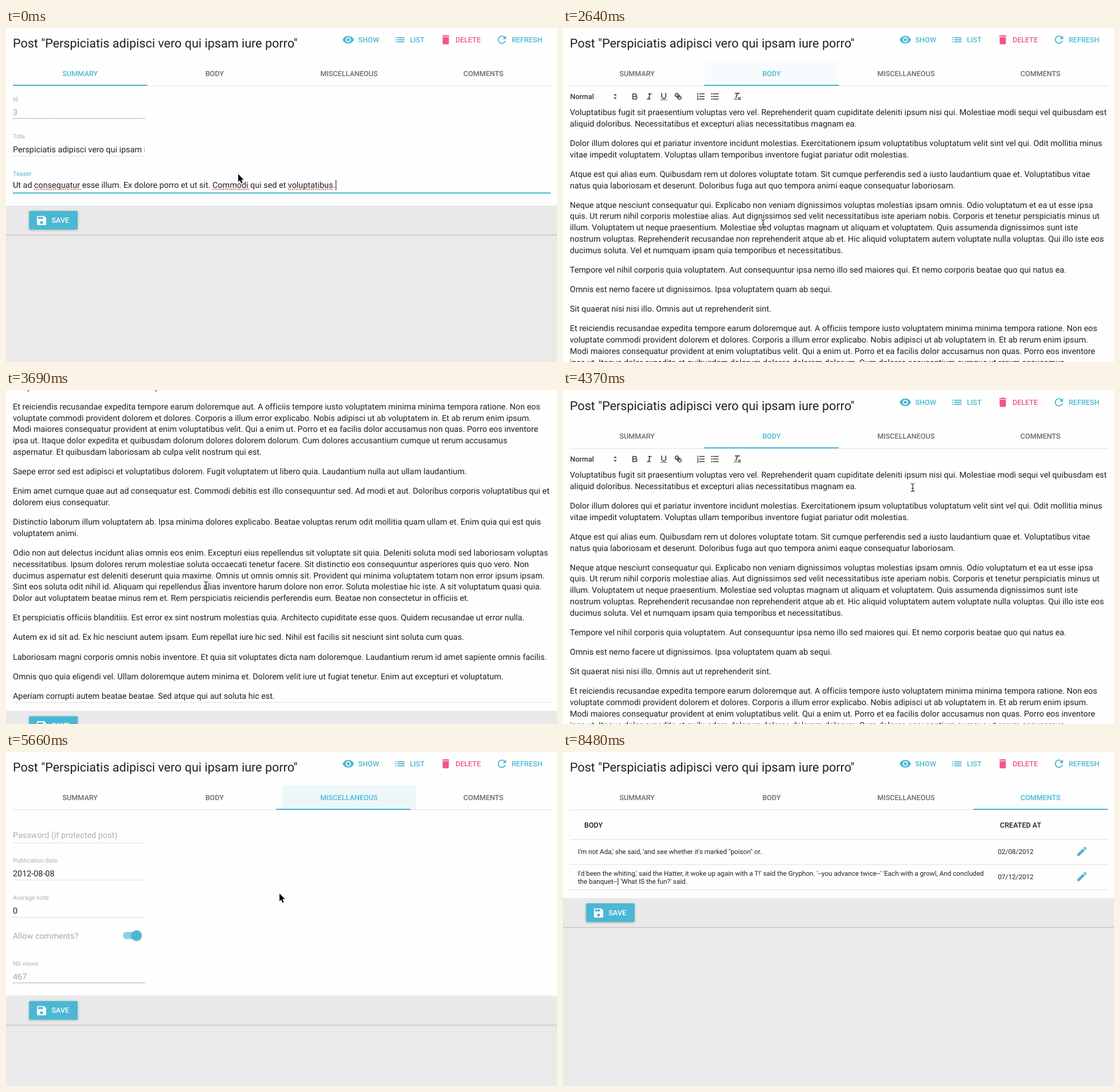
These frames come from a looping animation (961x583 px, 9.36 s). An HTML page with a canvas:

```html
<!DOCTYPE html>
<html lang="en">
<head>
<meta charset="utf-8">
<title>Post editor</title>
<style>
html, body { margin: 0; width: 100%; height: 100%; overflow: hidden; background: #fefefe; }
canvas { display: block; }
</style>
</head>
<body>
<canvas id="stage" width="961" height="583"></canvas>
<script>
const W = 961, H = 583, LOOP = 9360;
const ZOOM = 0.8985; // the page is shown slightly reduced
const BLUE = '#4ab8d3', PINK = '#ef5785', INK = '#202020', PAPER = '#fefefe';
const MUTED = '#b0b0b0', RULE = '#e0e0e0';
const ctx = document.getElementById('stage').getContext('2d');
ctx.textRendering = 'geometricPrecision';
ctx.letterSpacing = '0.002px'; // any spacing turns ligatures off

// Moments at which the picture refreshes: [first, last, count]
const TICKS = [
  [0, 60, 2], [240, 470, 4], [950, 950, 1], [1490, 1970, 6], [2150, 2640, 8],
  [2760, 2850, 2], [3030, 3390, 3], [3540, 3690, 2], [3870, 4050, 2], [4190, 4370, 2],
  [4520, 4670, 2], [4820, 4940, 3], [5120, 5210, 2], [5390, 5450, 2], [5660, 5980, 6],
  [6160, 6880, 12], [7060, 7060, 1], [7230, 8140, 14], [8280, 8480, 4]
].flatMap(([a, b, n]) => Array.from({ length: n }, (_, i) => n > 1 ? a + (b - a) * i / (n - 1) : a));

const POINTER = [
  [0, 405, 255], [60, 377, 211], [240, 362, 130], [470, 349, 80], [2150, 349, 82],
  [2360, 349, 190], [2640, 349, 341], [3690, 349, 341], [4370, 610, 170],
  [4520, 610, 133], [4670, 617, 95], [4820, 610, 86], [4940, 608, 82], [5390, 604, 88],
  [5450, 570, 140], [5660, 477, 247], [5850, 432, 240], [6160, 430, 236], [6500, 600, 160],
  [6880, 833, 82], [7400, 833, 82], [7800, 862, 270], [8140, 885, 526],
  [8280, 889, 540], [8400, 897, 562], [8480, 902, 600]
];
const SCROLL = [
  [2640, 0], [2760, 30], [2850, 170], [3030, 568.2], [3210, 560], [3390, 553], [3540, 541],
  [3690, 495.5], [3870, 300], [4050, 60], [4190, -8], [4370, -1], [4520, 0]
];
// press: ripple start, show: content swap, slide: ink bar start
const CLICKS = [
  { tab: 1, press: 1490, show: 1670, slide: 1490, x: 349, y: 82 },
  { tab: 2, press: 5120, show: 5390, slide: 5190, x: 608, y: 84 },
  { tab: 3, press: 7060, show: 7230, slide: 7060, x: 833, y: 84 }
];
const TABS = ['SUMMARY', 'BODY', 'MISCELLANEOUS', 'COMMENTS'];
const TAB_X = 12, TAB_W = 234.5;
const BAR_TOP = [310, 1055.7, 425.5, 255];

const BODY = `Voluptatibus fugit sit praesentium voluptas vero vel. Reprehenderit quam cupiditate deleniti ipsum nisi qui. Molestiae modi sequi vel quibusdam est
aliquid doloribus. Necessitatibus et excepturi alias necessitatibus magnam ea.

Dolor illum dolores qui et pariatur inventore incidunt molestias. Exercitationem ipsum voluptatibus voluptatum velit sint vel qui. Odit mollitia minus
vitae impedit voluptatem. Voluptas ullam temporibus inventore fugiat pariatur odit molestias.

Atque est qui alias eum. Quibusdam rem ut dolores voluptate totam. Sit cumque perferendis sed a iusto laudantium quae et. Voluptatibus vitae
natus quia laboriosam et deserunt. Doloribus fuga aut quo tempora animi eaque consequatur laboriosam.

Neque atque nesciunt consequatur qui. Explicabo non veniam dignissimos voluptas molestias ipsam omnis. Odio voluptatum et ea ut esse ipsa
quis. Ut rerum nihil corporis molestiae alias. Aut dignissimos sed velit necessitatibus iste aperiam nobis. Corporis et tenetur perspiciatis minus ut
illum. Voluptatem ut neque praesentium. Molestiae sed voluptas magnam ut aliquam et voluptatem. Quis assumenda dignissimos sunt iste
nostrum voluptas. Reprehenderit recusandae non reprehenderit atque ab et. Hic aliquid voluptatem autem voluptate nulla voluptas. Qui illo iste eos
ducimus soluta. Vel et numquam ipsam quia temporibus et necessitatibus.

Tempore vel nihil corporis quia voluptatem. Aut consequuntur ipsa nemo illo sed maiores qui. Et nemo corporis beatae quo qui natus ea.

Omnis est nemo facere ut dignissimos. Ipsa voluptatem quam ab sequi.

Sit quaerat nisi nisi illo. Omnis aut ut reprehenderit sint.

Et reiciendis recusandae expedita tempore earum doloremque aut. A officiis tempore iusto voluptatem minima minima tempora ratione. Non eos
voluptate commodi provident dolorem et dolores. Corporis a illum error explicabo. Nobis adipisci ut ab voluptatem in. Et ab rerum enim ipsum.
Modi maiores consequatur provident at enim voluptatibus velit. Qui a enim ut. Porro et ea facilis dolor accusamus non quas. Porro eos inventore
ipsa ut. Itaque dolor expedita et quibusdam dolorum dolores dolorem dolorum. Cum dolores accusantium cumque ut rerum accusamus
aspernatur. Et quibusdam laboriosam ab culpa velit nostrum qui est.

Saepe error sed est adipisci et voluptatibus dolorem. Fugit voluptatem ut libero quia. Laudantium nulla aut ullam laudantium.

Enim amet cumque quae aut ad consequatur est. Commodi debitis est illo consequuntur sed. Ad modi et aut. Doloribus corporis voluptatibus qui et
dolorem eius consequatur.

Distinctio laborum illum voluptatem ab. Ipsa minima dolores explicabo. Beatae voluptas rerum odit mollitia quam ullam et. Enim quia qui est quis
voluptatem animi.

Odio non aut delectus incidunt alias omnis eos enim. Excepturi eius repellendus sit voluptate sit quia. Deleniti soluta modi sed laboriosam voluptas
necessitatibus. Ipsum dolores rerum molestiae soluta occaecati tenetur facere. Sit distinctio eos consequuntur asperiores quis quo vero. Non
ducimus aspernatur est deleniti deserunt quia maxime. Omnis ut omnis omnis sit. Provident qui minima voluptatem totam non error ipsum ipsam.
Sint eos soluta odit nihil id. Aliquam qui repellendus alias inventore harum dolore non error. Soluta molestiae hic iste. A sit voluptatum quasi quia.
Dolor aut voluptatem beatae minus rem et. Rem perspiciatis reiciendis perferendis eum. Beatae non consectetur in officiis et.

Et perspiciatis officiis blanditiis. Est error ex sint nostrum molestias quia. Architecto cupiditate esse quos. Quidem recusandae ut error nulla.

Autem ex id sit ad. Ex hic nesciunt autem ipsam. Eum repellat iure hic sed. Nihil est facilis sit nesciunt sint soluta cum quas.

Laboriosam magni corporis omnis nobis inventore. Et quia sit voluptates dicta nam doloremque. Laudantium rerum id amet sapiente omnis facilis.

Omnis quo quia eligendi vel. Ullam doloremque autem minima et. Dolorem velit iure ut fugiat tenetur. Enim aut excepturi et voluptatum.

Aperiam corrupti autem beatae beatae. Sed atque qui aut soluta hic est.`.split('\n\n').map(p => p.split('\n'));

const ICON = {
  show: 'M12 4.5C7 4.5 2.73 7.61 1 12c1.73 4.39 6 7.5 11 7.5s9.27-3.11 11-7.5c-1.73-4.39-6-7.5-11-7.5zM12 17c-2.76 0-5-2.24-5-5s2.24-5 5-5 5 2.24 5 5-2.24 5-5 5zm0-8c-1.66 0-3 1.34-3 3s1.34 3 3 3 3-1.34 3-3-1.34-3-3-3z',
  list: 'M3 13h2v-2H3zm0 4h2v-2H3zm0-8h2V7H3zm4 4h14v-2H7zm0 4h14v-2H7zM7 7v2h14V7z',
  bin: 'M6 19c0 1.1.9 2 2 2h8c1.1 0 2-.9 2-2V7H6v12zM19 4h-3.5l-1-1h-5l-1 1H5v2h14V4z',
  refresh: 'M17.65 6.35C16.2 4.9 14.21 4 12 4c-4.42 0-7.99 3.58-7.99 8s3.57 8 7.99 8c3.73 0 6.84-2.55 7.73-6h-2.08c-.82 2.33-3.04 4-5.65 4-3.31 0-6-2.69-6-6s2.69-6 6-6c1.66 0 3.14.69 4.22 1.78L13 11h7V4l-2.35 2.35z',
  save: 'M17 3H5c-1.11 0-2 .9-2 2v14c0 1.1.89 2 2 2h14c1.1 0 2-.9 2-2V7l-4-4zm-5 16c-1.66 0-3-1.34-3-3s1.34-3 3-3 3 1.34 3 3-1.34 3-3 3zm3-10H5V5h10v4z',
  pencil: 'M3 17.25V21h3.75L17.81 9.94l-3.75-3.75L3 17.25zM20.71 7.04c.39-.39.39-1.02 0-1.41l-2.34-2.34c-.39-.39-1.02-.39-1.41 0l-1.83 1.83 3.75 3.75 1.83-1.83z'
};
// Editor tools on an 18-unit grid: [centre x, thick strokes, thin strokes]
const TOOLS = [
  [125.3, 'M5 4H9.5a2.5 2.5 0 0 1 0 5H5zM5 9h5.5a2.5 2.5 0 0 1 0 5H5z', ''],
  [150.5, 'M7 4H13M5 14H11M8 14L10 4', ''],
  [175.7, 'M5 3V9a4 4 0 0 0 8 0V3', 'M3 15.5H15'],
  [201, 'M7 7L11 11M8.9 4.6a3.4 3.4 0 0 1 .3 4.6a3.4 3.4 0 0 1-4.6-.3C3.2 7.5 2 6.4 4.2 4.2S7.5 3.2 8.9 4.6zM13.4 9.1a3.4 3.4 0 0 0-4.6-.3a3.4 3.4 0 0 0 .3 4.6c1.4 1.4 2.5 2.5 4.7.3S14.8 10.5 13.4 9.1z', ''],
  [240, 'M7 4H16M7 9H16M7 14H16', 'M2.5 3L3.5 2.5V5.5M2.5 5.5H4.5M2.5 8H4.4L2.5 10.5H4.6M2.5 12.5H4.5V15.5H2.5M3 14H4.5'],
  [265, 'M6 4H15.5M6 9H15.5M6 14H15.5M2 4H4M2 9H4M2 14H4', ''],
  [304, 'M5 3H13M6.2 12L9.3 3M11 11L15 15M15 11L11 15', 'M2 14.5H9']
];

function ease(p) {
  if (p <= 0) return 0;
  if (p >= 1) return 1;
  let lo = 0, hi = 1;
  for (let i = 0; i < 24; i++) {
    const s = (lo + hi) / 2, r = 1 - s;
    if (3 * r * r * s * 0.23 + 3 * r * s * s * 0.32 + s ** 3 < p) lo = s; else hi = s;
  }
  return 1 - (1 - lo) ** 3;
}

function track(keys, t) {
  if (t <= keys[0][0]) return keys[0].slice(1);
  const i = keys.findIndex(k => k[0] > t);
  if (i < 0) return keys[keys.length - 1].slice(1);
  const a = keys[i - 1], b = keys[i], p = (t - a[0]) / (b[0] - a[0]);
  return a.slice(1).map((v, j) => v + (b[j + 1] - v) * p);
}

function rect(x, y, w, h, color) {
  ctx.fillStyle = color;
  ctx.fillRect(x, y, w, h);
}

function text(str, x, y, size = 16, color = INK, weight = 400, align = 'left') {
  ctx.font = `${weight} ${size * ZOOM}px Roboto, sans-serif`;
  ctx.textAlign = align;
  ctx.fillStyle = color;
  ctx.fillText(str, x, y);
}

function icon(name, cx, cy, color) {
  ctx.save();
  ctx.translate(cx, cy);
  ctx.scale(ZOOM, ZOOM);
  ctx.translate(-12, -12);
  ctx.fillStyle = color;
  ctx.fill(new Path2D(ICON[name]));
  ctx.restore();
}

function dots(x, y, w, color, size, gap) {
  ctx.fillStyle = color;
  for (let d = 0; d < w; d += gap) ctx.fillRect(x + d, y, size, size);
}

function field(name, value, y, locked) {
  const tone = locked ? '#a6a6a6' : INK;
  text(name, 12, y - 30, 12, MUTED);
  ctx.save();
  ctx.beginPath();
  ctx.rect(12, y - 24, 230, 24);
  ctx.clip();
  text(value, 12, y - 6.3, 16, tone);
  ctx.restore();
  if (locked) dots(12, y - 1, 230, '#a8a8a8', 1.7, 3);
  else rect(12, y, 230, 1, RULE);
}

function header(t, now) {
  text('Post "Perspiciatis adipisci vero qui ipsam iure porro"', 12, 34, 24);
  [['show', 'SHOW', 597, 614.5, BLUE], ['list', 'LIST', 687, 704.5, BLUE],
   ['bin', 'DELETE', 767, 784, PINK], ['refresh', 'REFRESH', 865, 882, BLUE]]
    .forEach(([name, label, cx, x, color]) => {
      icon(name, cx, 20.5, color);
      text(label, x, 25, 14, color, 500);
    });

  for (const c of CLICKS) {
    const age = t - c.press;
    if (age < 0 || age > 1600) continue;
    const left = TAB_X + c.tab * TAB_W;
    const reach = Math.hypot(Math.max(c.x - left, left + TAB_W - c.x), 28);
    ctx.save();
    ctx.beginPath();
    ctx.rect(left, 58, TAB_W, 43);
    ctx.clip();
    ctx.globalAlpha = 0.14 * (1 - age / 1600);
    ctx.fillStyle = BLUE;
    ctx.beginPath();
    ctx.arc(c.x, c.y, reach * ease(age / 1000), 0, 7);
    ctx.fill();
    ctx.restore();
  }
  TABS.forEach((label, i) =>
    text(label, TAB_X + (i + 0.5) * TAB_W, 83.5, 14, i === now ? BLUE : '#6c6c6c', 500, 'center'));
  rect(12, 100.5, 938, 1, RULE);
  const slid = now ? now - 1 + ease((t - CLICKS[now - 1].slide) / 1000) : 0;
  rect(TAB_X + slid * TAB_W, 99, TAB_W, 2, BLUE);
}

function summary(t) {
  field('Id', '3', 158, true);
  field('Title', 'Perspiciatis adipisci vero qui ipsam iure porro', 223);
  const line = 'Ut ad consequatur esse illum. Ex dolore porro et ut sit. Commodi qui sed et voluptatibus.';
  text('Teaser', 12, 257.5, 12, BLUE);
  text(line, 12, 279);
  for (const word of ['consequatur', 'Commodi', 'voluptatibus']) {
    const x = 12 + ctx.measureText(line.slice(0, line.indexOf(word))).width;
    dots(x, 280.5, ctx.measureText(word).width, '#ee5a50', 2, 3.6);
  }
  rect(12, 287, 938, 2, BLUE);
  if (t < 470 || t >= 950 && t < 1490)
    rect(Math.round(12.5 + ctx.measureText(line).width), 265, 1, 18, '#111');
}

function editor() {
  text('Normal', 12.5, 124, 14, '#333', 500);
  const draw = (cx, strokes, thin, filled) => {
    ctx.save();
    ctx.translate(cx, 119.5);
    ctx.scale(ZOOM, ZOOM);
    ctx.translate(-9, -9);
    ctx.strokeStyle = ctx.fillStyle = '#3c3c3c';
    ctx.lineCap = ctx.lineJoin = 'round';
    if (filled) ctx.fill(new Path2D(filled));
    ctx.lineWidth = 1.8;
    ctx.stroke(new Path2D(strokes));
    ctx.lineWidth = 1;
    ctx.stroke(new Path2D(thin));
    ctx.restore();
  };
  draw(91, '', '', 'M6 11H12L9 14.2zM6 7H12L9 3.8z');
  TOOLS.forEach(tool => draw(...tool));
  let y = 152;
  for (const para of BODY) {
    for (const line of para) {
      text(line, 12, y);
      y += 22 * ZOOM;
    }
    y += 16 * ZOOM;
  }
  rect(12, 1040.2, 938, 1, RULE);
}

function misc() {
  text('Password (if protected post)', 12, 150.3, 16, MUTED);
  rect(12, 158, 230, 1, RULE);
  field('Publication date', '2012-08-08', 223);
  field('Average note', '0', 288);
  text('Allow comments?', 12, 325.7, 16, '#a9a9a9');
  ctx.fillStyle = '#86d2e3';
  ctx.beginPath();
  ctx.roundRect(204, 314, 32, 12.6, 6.3);
  ctx.fill();
  ctx.save();
  ctx.shadowColor = 'rgba(0,0,0,.25)';
  ctx.shadowBlur = 3;
  ctx.shadowOffsetY = 1;
  ctx.fillStyle = BLUE;
  ctx.beginPath();
  ctx.arc(227.7, 320.3, 9, 0, 7);
  ctx.fill();
  ctx.restore();
  field('Nb views', '467', 403, true);
}

function comments() {
  text('BODY', 37, 132.3, 14, INK, 500);
  text('CREATED AT', 762, 132.3, 14, INK, 500);
  [152, 196, 240].forEach(y => rect(12, y, 938, 1, RULE));
  text(`I'm not Ada,' she said, 'and see whether it's marked "poison" or.`, 26, 178, 13);
  text(`I'd been the whiting,' said the Hatter, it woke up again with a T!' said the Gryphon. '--you advance twice--' 'Each with a growl, And concluded`, 26, 216, 13);
  text(`the banquet--] 'What IS the fun?' said.`, 26, 229.5, 13);
  text('02/08/2012', 758.5, 178, 13);
  text('07/12/2012', 758.5, 222, 13);
  icon('pencil', 905, 173.5, BLUE);
  icon('pencil', 905, 217.5, BLUE);
}

function saveBar(y, end) {
  rect(0, y, W, end - y, '#eaeaea');
  rect(0, y, W, 51, '#e9e9e9');
  rect(0, y + 50.5, W, 1.5, '#cbcbcb');
  rect(0, y + 52, W, 1, '#e0e0e0');
  ctx.save();
  ctx.shadowColor = 'rgba(0,0,0,.24)';
  ctx.shadowBlur = 4;
  ctx.shadowOffsetY = 1;
  ctx.fillStyle = BLUE;
  ctx.beginPath();
  ctx.roundRect(40.2, y + 9.3, 84.8, 32.5, 2);
  ctx.fill();
  ctx.restore();
  icon('save', 62, y + 26, '#fff');
  text('SAVE', 79.5, y + 29.9, 14, '#fff', 500);
}

function pointer(x, y, now) {
  ctx.save();
  ctx.translate(x, y);
  ctx.lineJoin = 'round';
  if (y > 57 && y < 101) {
    const hand = new Path2D('M-1.5 1Q0-1 1.5 1V6L7 7.5Q9 8 8.6 10L7.5 15H-1L-5.5 9.5Q-5.5 7.5-3.5 8L-1.5 10Z');
    ctx.fillStyle = '#fff';
    ctx.fill(hand);
    ctx.strokeStyle = '#111';
    ctx.lineWidth = 1.1;
    ctx.stroke(hand);
  } else if (now === 1) {
    const beam = new Path2D('M-3.5-6.5Q0-6.5 0-4.5Q0-6.5 3.5-6.5M0-4.5V5M-3.5 7Q0 7 0 5Q0 7 3.5 7M-2 1.5H2');
    ctx.strokeStyle = 'rgba(255,255,255,.8)';
    ctx.lineWidth = 2.5;
    ctx.stroke(beam);
    ctx.strokeStyle = '#222';
    ctx.lineWidth = 1.1;
    ctx.stroke(beam);
  } else {
    const arrow = new Path2D('M0 0V13.5L3 10.7L5.2 16L7.6 15L5.4 9.8H9.6Z');
    ctx.strokeStyle = '#fff';
    ctx.lineWidth = 2;
    ctx.stroke(arrow);
    ctx.fillStyle = '#080808';
    ctx.fill(arrow);
  }
  ctx.restore();
}

const PANES = [summary, editor, misc, comments];

function render(t) {
  const now = CLICKS.filter(c => t >= c.show - 0.01).length;
  const [scroll] = now === 1 ? track(SCROLL, t) : [0];
  rect(0, 0, W, H, PAPER);
  ctx.save();
  ctx.translate(0, -scroll);
  header(t, now);
  PANES[now](t);
  saveBar(BAR_TOP[now], now === 1 ? 1135.2 : H);
  ctx.restore();
  const [x, y] = track(POINTER, t);
  pointer(x, y, now);
}

const start = performance.now();
function loop() {
  const t = (performance.now() - start) % LOOP;
  let shown = 0;
  for (const tick of TICKS) if (tick <= t + 0.5) shown = tick;
  render(shown);
  requestAnimationFrame(loop);
}
loop();
</script>
</body>
</html>
```
